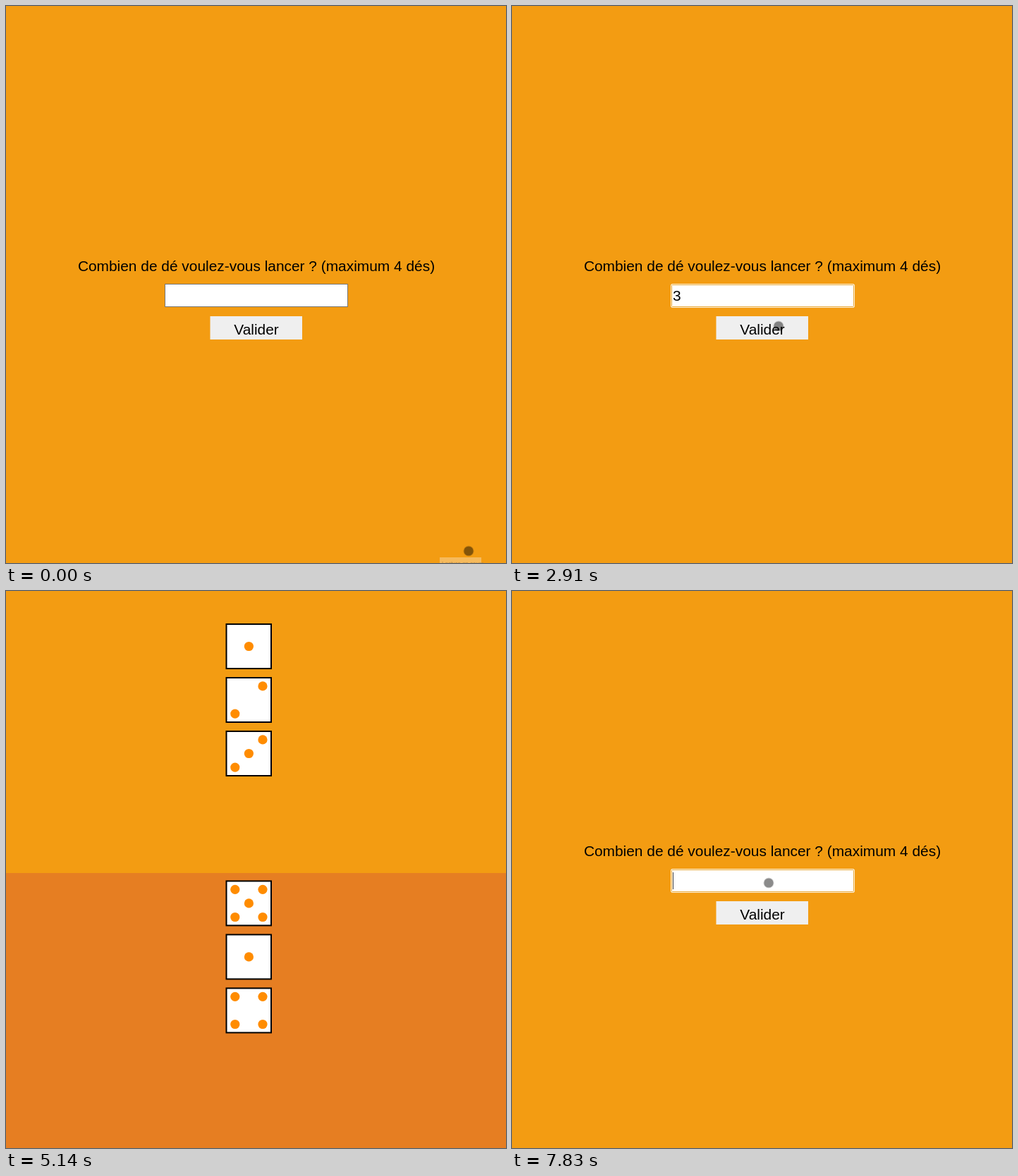
Animation, 709 px wide and 790 px high, one loop 8000 ms. Source, as an HTML page:

```html
<!DOCTYPE html>
<html lang="fr">
<head>
<meta charset="utf-8">
<title>Lancer de dés</title>
<style>
  html, body { margin: 0; width: 100%; height: 100%; overflow: hidden; background: #f39c12; }
  svg { display: block; width: 100vw; height: 100vh; }
  text { font-family: "Liberation Sans", Arial, sans-serif; font-size: 20.9px; }
</style>
</head>
<body>
<svg viewBox="0 0 709 790">
  <rect width="709" height="790" fill="#f39c12"/>

  <g id="form">
    <text x="355" y="376" text-anchor="middle">Combien de dé voulez-vous lancer ? (maximum 4 dés)</text>
    <rect id="field" x="225.5" y="394.5" width="259" height="32" fill="#fff" stroke="#767676"/>
    <g id="ring">
      <rect x="225.5" y="394.5" width="260" height="33" rx="2" fill="#fff" stroke="#fff3dc"/>
      <rect x="226.5" y="395.5" width="258" height="31" rx="1" fill="#fff" stroke="#e8a838"/>
    </g>
    <text id="value" x="228" y="418">3</text>
    <rect id="caret" y="399" width="1" height="24" fill="#444"/>
    <rect x="289.5" y="440" width="130.5" height="33" fill="#efefef"/>
    <text x="355" y="466" text-anchor="middle">Valider</text>
  </g>

  <g id="result">
    <rect y="400" width="709" height="390" fill="#e67e22"/>
    <g id="dice"></g>
  </g>

  <g id="tip">
    <rect x="615" y="782" width="59" height="8" fill="#f6ba5c"/>
    <text x="618" y="793" style="font-size:8px" fill="#b98a45">Lecture en cours</text>
  </g>
  <path id="arrow" transform="translate(296 -6) scale(.88)" d="M0 0V16L4 12.5 6.5 19 9 18 6.3 11.7H11.5Z" fill="#fff" stroke="#000"/>
  <g id="dot">
    <circle r="7.6" opacity=".15"/>
    <circle r="6.6" opacity=".36"/>
  </g>
</svg>

<script>
const LOOP = 8000, STEP = 66, BLINK = 520;
const CLICK = 1160, TYPE = 2370, ROLL = 3380, RELOAD = 6610, REFOCUS = 7760;
const $ = id => document.getElementById(id);
const show = (id, on) => $(id).setAttribute("visibility", on ? "visible" : "hidden");

// Pointer moves: eased quadratic curves from a past b to c
const moves = [
  { start: 0, time: 858, a: [656, 773], b: [500, 440], c: [412, 411] },
  { start: 2504, time: 396, a: [412, 411], b: [396, 430], c: [378, 454] },
  { start: 4524, time: 594, a: [378, 453], b: [296, 235], c: [309, -10] },
  { start: 6680, time: 858, a: [302, 10], b: [310, 230], c: [364, 414] }
];

function pointer(t) {
  const { start, time, a, b, c } = moves.filter(m => t >= m.start).pop();
  const u = Math.min(1, Math.floor((t - start) / STEP) * STEP / time);
  const e = u * u * (3 - 2 * u), r = 1 - e;
  return a.map((v, i) => r * r * v + 2 * r * e * b[i] + e * e * c[i]);
}

// Pips for a face: centre, then the two diagonals
function pips(n) {
  const p = n % 2 ? [[0, 0]] : [];
  if (n > 1) p.push([1, -1], [-1, 1]);
  if (n > 3) p.push([-1, -1], [1, 1]);
  return p;
}

function die(y, n) {
  const dots = pips(n).map(([i, j]) =>
    `<circle cx="${344.4 + 19.6 * i}" cy="${y + 32.5 + 19.6 * j}" r="6.6" fill="#ff8c00"/>`);
  return `<rect x="312.5" y="${y + 1}" width="63.5" height="63" fill="#fff" stroke="#000" stroke-width="2"/>` + dots.join("");
}

const column = (top, faces) => faces.map((n, i) => die(top + 76 * i, n)).join("");
$("dice").innerHTML = column(46, [1, 2, 3]) + column(410.4, [5, 1, 4]);

function caretOn(t) {
  const last = [CLICK, TYPE, REFOCUS].filter(k => t >= k).pop();
  return (t - last) % (2 * BLINK) < BLINK;
}

function draw(t) {
  const result = t >= ROLL && t < RELOAD;
  const typed = t >= TYPE && t < ROLL;
  const focus = t >= CLICK && t < ROLL || t >= REFOCUS;
  const arrow = t >= RELOAD && t < moves[3].start;
  show("form", !result);
  show("result", result);
  show("field", !result && !focus);
  show("ring", focus);
  show("value", typed);
  show("caret", focus && caretOn(t));
  $("caret").setAttribute("x", typed ? 239 : 228);
  $("tip").setAttribute("opacity", Math.max(0, Math.min(1, 1.4 - t / 150)));
  show("arrow", arrow);
  show("dot", !arrow);
  $("dot").setAttribute("transform", `translate(${pointer(t)})`);
}

const begin = performance.now();
function frame() {
  draw((performance.now() - begin) % LOOP);
  requestAnimationFrame(frame);
}
draw(0);
requestAnimationFrame(frame);
</script>
</body>
</html>
```
